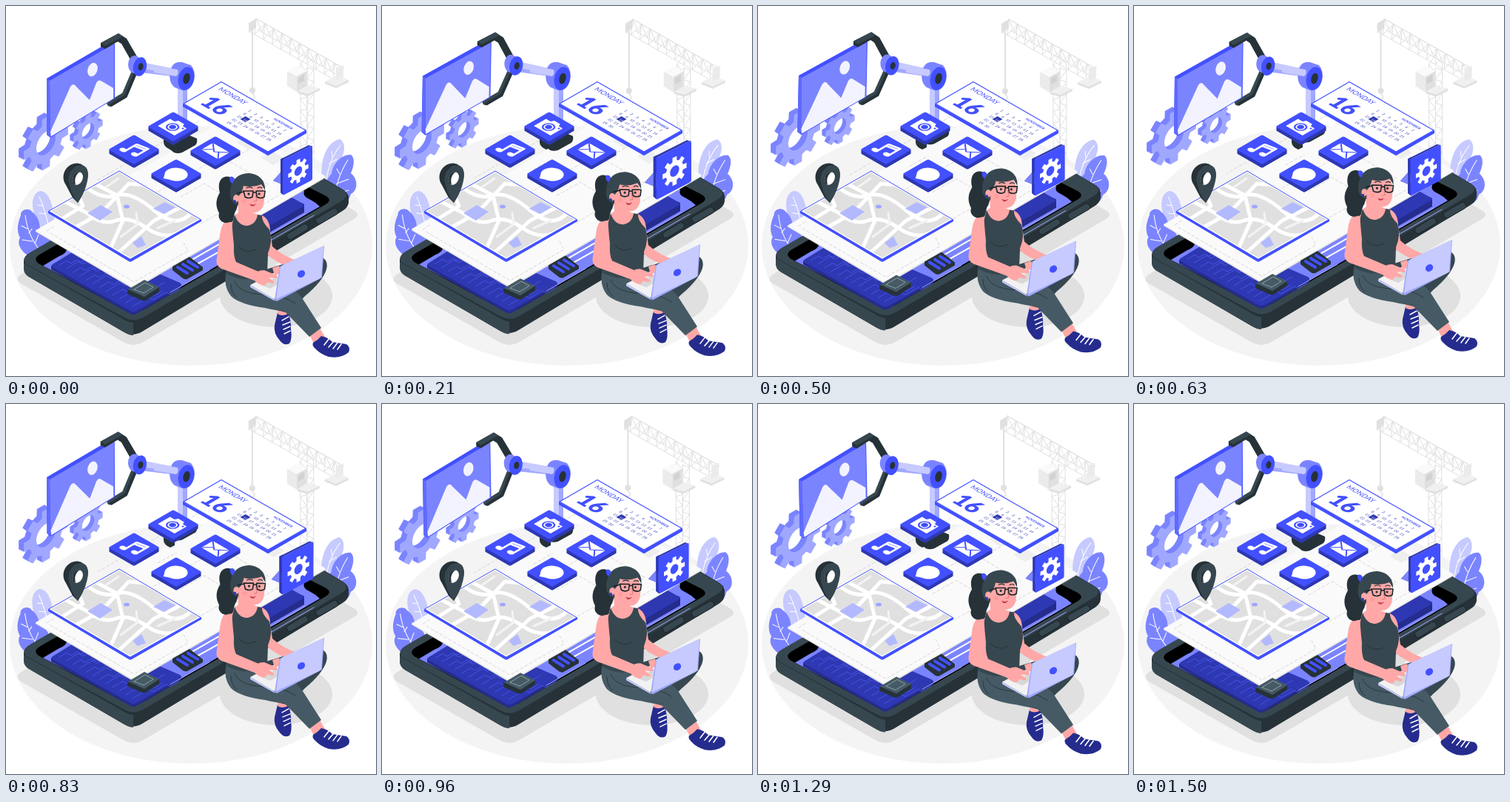
Animation of 500x500 px, one loop 1.54 s. Source, as an HTML page:

```html
<!DOCTYPE html>
<html lang="en">
<head>
<meta charset="utf-8">
<style>
html, body { margin: 0; width: 100%; height: 100%; overflow: hidden; background: #fff; }
svg { display: block; width: 100vw; height: 100vh; }
path, polyline, line { stroke-linejoin: round; stroke-linecap: round; }
.ln { fill: none; }
.b { fill: #4250ff } .b2 { fill: #2e38b2 } .b3 { fill: #252c8e }
.p { fill: #7b84ff } .l { fill: #a0a7ff } .ll { fill: #c6caff }
.w { fill: #fff } .g { fill: #e0e0e0 } .f { fill: #fafafa }
.d { fill: #263238 } .d2 { fill: #37474f } .d3 { fill: #455a64 }
.s { fill: #ffa8a7 }
text { font-family: Lato, Inter, sans-serif; fill: #4250ff; text-anchor: middle; }
</style>
</head>
<body>
<svg viewBox="0 0 500 500">
<defs><clipPath id="mapClip"><path d="M61 277 153 225 260 288 168 340Z"/></clipPath></defs>

<ellipse cx="250" cy="324" rx="245" ry="162" fill="#f4f4f4"/>

<g id="crane">
  <path id="truss" class="ln" stroke="#e0e0e0" stroke-width="1"/>
  <path class="g" d="M328 23 338 17V29L328 36Z M332 30H334V112H332Z"/>
  <circle class="g" cx="333" cy="114" r="4"/>
  <path class="ln" stroke="#e0e0e0" stroke-width="1.5" d="M333 118Q339 124 333 126Q330 126 330 123"/>
  <path class="f" d="M380 88 393 81 406 88 393 95Z"/>
  <path fill="#ebebeb" d="M380 88 393 95V116L380 108Z"/><path class="g" d="M393 95 406 88V109L393 116Z"/>
  <path fill="#d2d2d2" d="M395 97 403 92V101L395 105Z"/>
  <path fill="#f0f0f0" d="M394 115 408 107 424 111 408 119Z"/><path class="g" d="M394 115 408 119 424 111V114L408 122 394 118Z"/>
  <path fill="#f0f0f0" d="M431 102 448 94 463 100 446 108Z"/><path class="g" d="M431 102 446 108 463 100V103L446 111 431 105Z"/>
  <path fill="#ebebeb" d="M446 84 456 80V96L446 101Z"/>
</g>

<g id="gears"></g>

<g id="leftPlant">
  <path class="ll" d="M50 302C33 283 31 254 46 250C57 250 65 266 66 302Z"/>
  <path class="p" d="M50 345C28 342 12 325 19 313C13 303 17 290 20 283C19 275 31 272 35 278C42 283 45 290 46 299C56 304 62 312 63 335Z"/>
  <path class="ln" stroke="#fff" stroke-width="1" d="M45 258Q53 275 58 300M50 270 43 269M54 281 45 280M26 283Q30 315 52 337M29 301 21 297M36 318 22 316M35 301 31 307M44 309 39 321"/>
</g>
<g id="rightPlant">
  <path class="ll" d="M430 245C421 219 430 184 451 180C461 185 458 204 447 213C445 228 439 240 430 245Z"/>
  <path class="p" d="M440 270C428 257 429 236 440 227C441 213 454 200 466 201C473 206 469 220 466 226C477 235 475 250 466 254C463 267 450 272 440 270Z"/>
  <path class="ln" stroke="#fff" stroke-width="1" d="M452 188Q437 207 432 238M441 204 440 196M437 213 447 207M462 208Q445 235 444 265M451 227 447 220M447 240 463 234M445 251 435 243M445 254 463 249"/>
</g>

<path class="g" d="M18 364Q12 369 20 375L160 455Q172 461 184 455L470 288Q480 282 470 276L300 180Z"/>
<ellipse class="g" cx="365" cy="392" rx="76" ry="42"/>

<g id="phone">
  <path class="d" d="M24 345Q24 338 33 333L300 178 430 233 452 246Q463 252 463 259V266Q462 273 453 278L184 440Q172 447 160 441L31 366Q24 362 24 354Z"/>
  <path class="d2" d="M24 347 160 424Q166 428 172 428V445Q166 445 160 441L31 366Q24 362 24 354Z"/>
  <path class="d2" d="M30 351Q18 342 33 333L300 178 430 234 452 247Q467 255 454 263L185 421Q172 428 160 421Z"/>
  <path class="ln" stroke="#263238" stroke-width=".8" d="M27 349 160 422Q166 426 172 426"/>
  <path fill="#000" d="M44 348Q36 342 45 336L300 190 431 256Q442 262 432 268L185 411Q172 418 160 411Z"/>
  <path class="p" d="M50 351 72 338Q85 333 81 325L80 320 300 195 403 250Q400 257 410 261Q418 265 424 271L185 409Q172 416 160 409Z"/>
  <path class="b3" d="M61 351 61 356 168 416Q172 418 176 416L237 381V376Z"/>
  <path class="b2" d="M63 349 110 320 235 374Q239 377 235 379L176 412Q172 414 168 412L63 353Q60 351 63 349Z"/>
  <path id="circuit" class="ln" stroke="#4a56e8" stroke-width=".9"/>
  <path class="b3" d="M310 306 400 266 403 268V279L330 321Z"/>
  <path class="b2" d="M290 302 385 258 401 267Q404 269 401 271L325 315Z"/>
  <path class="ln" stroke="#a0a7ff" stroke-width="1" d="M345 324 416 283M222 387 275 357M345 316 405 281"/>
  <path class="ln" stroke="#1b2429" stroke-width="10" d="M384 311 404 299M423 290 444 278"/>
  <path class="ln" stroke="#37474f" stroke-width="8" d="M384 311 404 299M423 290 444 278"/>

  <path class="ln" stroke="#fff" stroke-width="2" d="M235 341 320 292M246 346 330 298M258 349 340 303"/>
  <path class="g" d="M40 303V305L171 382Q173 383 175 382L432 232V230Z"/>
  <path class="f" d="M42 302 299 152 430 229Q433 230 430 232L175 380Q173 381 171 380L42 305Q39 303 42 302Z"/>
  <path class="ln" stroke="#d8d8d8" stroke-width="1" stroke-dasharray="4 3" d="M55 304 66 297M60 307 173 373 246 331 240 320M200 254 290 203 355 241 262 295M124 235 260 156M285 260 315 277 338 263M236 258 268 240 305 262M300 210 335 190 410 232 320 284M205 223 230 209"/>
  <path fill="#eeeeee" d="M312 184 325 177 340 186 327 194ZM345 205 360 196 376 206 361 215Z"/>

  <path class="d" d="M164 384V389L184 398Q187 399 190 397L207 386V380Z"/>
  <path class="d3" d="M165 383 187 370 207 380 187 393Z"/>
  <path class="ln" stroke="#90a4ae" stroke-width="1" stroke-dasharray="3 1" d="M173 383 188 374 199 380 186 388Z"/>
  <path class="d" d="M225 352 248 339 266 353V357L245 369Q242 370 239 368L225 357Z"/>
  <path class="ln" stroke="#4250ff" stroke-width="4" d="M232 353 245 361M239 349 252 357M246 345 259 353"/>
</g>

<path class="d" d="M213 180H228V191L222 194Q213 190 213 184Z"/>
<g id="robotBase">
  <path class="d" d="M214 183Q213 188 218 191L227 198Q232 200 238 198L256 188Q259 185 258 179L236 170Z"/>
</g>
<path class="ll" d="M232 104H245V168H232Z"/><path class="l" d="M239 108H245V168H239Z"/>
<g id="arm">
  <path class="ln" stroke="#37474f" stroke-width="7" d="M174 87 160 120 140 132"/>
  <path class="ln" stroke="#263238" stroke-width="4" d="M175 91 162 122 142 134"/>
  <path class="b" d="M55 98 141 48 147 51V125L60 178 55 174Z"/>
  <path class="p" d="M59 101 146 51V125L60 177Z"/>
  <path fill="#5f6aff" d="M55 98 59 101 60 177 55 174Z"/>
  <path fill="#f3f3ff" d="M61 176 60 170 87 109Q91 103 95 109L113 127 122 104Q125 98 130 102L145 111V125Z"/>
  <ellipse cx="117" cy="86" rx="6.5" ry="9.5" fill="#f3f3ff" transform="rotate(18 117 86)"/>
  <path class="d" d="M128 50 152 37 163 44 178 70 169 74 156 51 151 48 134 58 128 55Z"/>
  <path class="d2" d="M128 50 152 37 158 41 134 54Z"/>
  <path class="ll" d="M184 76 234 86V96L184 90Z"/><path class="l" d="M184 85 234 92V96L184 90Z"/>
  <ellipse class="p" cx="174" cy="79" rx="9" ry="12"/>
  <ellipse class="b" cx="181" cy="82" rx="9" ry="13" transform="rotate(12 181 82)"/>
  <ellipse class="d" cx="182" cy="82" rx="3.5" ry="5" transform="rotate(12 182 82)"/>
</g>
<path class="p" d="M222 88Q225 74 238 76L250 80Q257 88 254 101Q249 116 238 114L228 110Q219 103 222 88Z"/>
<path class="ll" d="M200 80 232 86Q234 92 230 95L200 90Z"/>
<ellipse class="b" cx="243.500" cy="98" rx="10.500" ry="16" transform="rotate(14 243.5 98)"/>
<ellipse class="d" cx="244" cy="98" rx="4.500" ry="7.500" transform="rotate(14 244 98)"/>

<path class="b" d="M57 277 168 340 264 288V291L170 345Q168 346 166 345L57 280Z"/>
<path fill="#fff" stroke="#4250ff" d="M58 277 153 223 263 288.500 168 342Z"/>
<g clip-path="url(#mapClip)">
  <path class="g" d="M58 277 153 223 263 289 168 343Z"/>
  <path class="ln" stroke="#fff" stroke-width="5" d="M75 262 110 280Q130 297 148 290T190 300T238 305M110 246Q130 262 150 256T200 276T250 280M120 240 150 256 158 290 140 330M92 300 128 280 166 240 200 243M150 335 172 315 200 290 236 272M75 288 104 270 96 252"/>
  <path class="ln" stroke="#f3f3f3" stroke-width="3" d="M135 245 152 233M155 312 178 295 176 280M205 300 228 290"/>
  <path fill="#b3b9ff" d="M110 280 128 269 144 278 127 290ZM199 274 214 265 229 272 214 281ZM171 320 183 311 189 323 178 327Z"/>
  <ellipse cx="163" cy="271" rx="4" ry="2.500" class="l"/>
</g>

<path class="d" d="M81 242C70 225 88 207 102 214L108 218Q112 224 110 234Q106 252 97 266L90 259Z"/>
<path class="d2" d="M85 238C82 224 95 212 105 216C114 221 111 234 108 244Q104 256 97 266Q87 252 85 238Z"/>
<ellipse cx="97" cy="233" rx="6.500" ry="9" class="w" transform="rotate(25 97 233)"/>
<path class="d" d="M91 240C88 231 93 224 100 224C94 228 92 234 94 241Z"/>

<g id="icons"></g>

<path class="b" d="M239 132V136L352 201Q354 203 356 201L406 172V168L354 196Z"/>
<path fill="#fff" stroke="#4250ff" stroke-width="1.200" d="M240 132 291 102.500 405 168 354 197Z"/>
<g id="calendar"></g>

<g id="notice">
  <path class="b2" d="M371 207 375 205V255L371 252V240L361 236 371 225Z"/>
  <path class="p" d="M361 236 371 225 375 227V242Z"/>
  <path class="b" d="M374 208 412 189Q414 188 414 191V233Q414 235 412 236L376 255Q374 256 374 253Z"/>
  <path class="b2" d="M371 207 409 188 412 189 374 208V255L371 252Z"/>
  <g id="noticeGear"></g>
</g>

<g id="woman">
  <path class="b3" d="M367 414 381 412Q386 428 385 437Q387 450 383 456Q376 460 370 452Q361 442 363 431Z"/>
  <path class="ln" stroke="#fff" stroke-width="1.500" d="M373 425 382 420M374 431 384 427M375 437 384 433M376 443 384 439"/>
  <path class="s" d="M367 408 380 407 381 416Q373 420 367 416Z"/>
  <path class="d2" d="M345 358 410 338Q438 336 433 356Q428 372 404 392L382 415 366 411 385 378 350 390Z"/>
  <path class="s" d="M411 446 424 435 432 449Q426 457 416 456Z"/>
  <path class="b3" d="M415 455Q422 451 426 446Q434 447 441 454L460 457Q466 461 463 468Q452 477 436 474Q424 470 418 463Q413 459 415 455Z"/>
  <path class="ln" stroke="#fff" stroke-width="1.600" d="M430 458 437 449M436 461 443 453M442 463 448 455M448 464 453 457"/>
  <path class="d3" d="M298 358Q293 378 304 392Q315 403 350 408Q366 412 376 412L410 447 426 435 401 396Q393 383 376 380L353 362Z"/>
  <path class="ln" stroke="#263238" stroke-width=".8" d="M309 372Q315 388 346 390Q374 390 391 402M304 376Q304 388 312 394M376 381Q392 382 402 374"/>
  <path class="s" d="M344 282Q357 287 357 305L360 325Q374 338 396 345L391 354Q366 349 352 335Z"/>
  <path class="s" d="M313 264 330 268 332 279 347 284 340 310H308L304 287 314 279Z"/>
  <path class="d2" d="M309 282Q314 297 326 297Q338 295 340 282L346 283Q345 291 356 302Q361 317 354 334L353 362Q326 377 298 362L305 338 303 305Z"/>
  <path class="ln" stroke="#263238" stroke-width=".9" d="M314 325Q324 336 338 329"/>
  <path class="s" d="M305 285Q291 290 289 310L285 340Q282 352 294 356L336 371 346 361 311 346Q307 338 308 323 306 306 305 285Z"/>
  <path fill="#f2f2f2" d="M330 377 365 359 398 376 362 396Z"/>
  <path class="ll" d="M330 377 362 396 364 399 330 380Z"/>
  <path fill="#d8d8d8" d="M345 377 366 366 376 371 357 382Z"/>
  <path class="s" d="M334 369Q335 357 349 357L366 364Q369 367 364 368L355 367 363 373Q361 377 354 373L349 378Q341 377 334 369Z"/>
  <path class="s" d="M360 354 369 351 373 361 363 364Z"/>
  <path class="l" d="M363 397 370 352 430 324 427 367 366 399Z"/>
  <path class="ll" d="M365 396 371 353Q372 351 374 350L427 325Q429 324 429 327L426 364Q426 367 423 369Z"/>
  <ellipse class="b" cx="399" cy="362" rx="5.500" ry="4.500" transform="rotate(-40 399 362)"/>
  <g id="head">
    <path class="d" d="M306 232C291 226 285 238 289 252C282 264 284 272 288 280C285 289 295 296 302 292C310 293 306 283 311 276C316 264 316 244 306 232Z"/>
    <path class="s" d="M312 247 340 235Q350 245 349 260Q349 277 337 279Q323 282 314 272Z"/>
    <path class="d2" d="M303 258C301 240 310 226 328 226C343 227 351 237 350 249L345 241Q333 246 321 243Q319 253 314 257L314 269Q305 267 303 258Z"/>
    <path class="b" d="M302 231Q307 229 309 234L306 240Q302 239 302 231Z"/>
    <ellipse class="s" cx="311" cy="260" rx="4" ry="5"/><circle class="b2" cx="309" cy="264" r="2"/>
    <path class="ln" stroke="#263238" stroke-width="1.200" d="M325 246Q329 244 333 246M340 246Q343 244 346 246"/>
    <path class="ln" stroke="#1b2429" stroke-width="1.600" d="M313 253 321 251M321 250H334L333 258Q328 261 323 258ZM338 250H350L349 258Q344 261 339 258ZM334 252H338"/>
    <circle class="d" cx="328" cy="254" r="1.600"/><circle class="d" cx="342" cy="254" r="1.600"/>
    <path class="ln" stroke="#e57373" stroke-width="1" d="M337 255 339 263 335 264"/>
    <path fill="#c62f4b" d="M329 267Q334 270 338 267Q335 272 331 270Z"/>
    <circle cx="322" cy="264" r="3" fill="#ff8f8f" opacity=".5"/>
  </g>
</g>
</svg>
<script>
const LOOP = 1540, TAU = Math.PI * 2;
const $ = id => document.getElementById(id);

function gearPath(teeth, outer, inner, hole) {
  let d = '';
  for (let i = 0; i < teeth; i++) {
    [[-.32, inner], [-.22, outer], [.22, outer], [.32, inner]].forEach(([k, r]) => {
      const a = (i + k) / teeth * TAU;
      d += (d ? 'L' : 'M') + (Math.cos(a) * r).toFixed(2) + ' ' + (Math.sin(a) * r).toFixed(2);
    });
  }
  return `${d}ZM${hole} 0A${hole} ${hole} 0 1 0 ${-hole} 0A${hole} ${hole} 0 1 0 ${hole} 0Z`;
}

// Upright gear facing right, extruded toward the left
function gear(x, y, outer, inner, hole, depth, teeth = 8) {
  const d = gearPath(teeth, outer, inner, hole);
  let out = '';
  for (let i = depth; i >= 0; i--)
    out += `<path class="${i ? 'p' : 'l'}" fill-rule="evenodd" d="${d}" transform="matrix(.866 -.5 0 1 ${x - i} ${y - i * .5})"/>`;
  return out;
}
$('gears').innerHTML = gear(111, 169, 23, 17, 9.5, 5) + gear(54, 185, 35, 26, 15, 7);
$('noticeGear').innerHTML = `<path class="w" fill-rule="evenodd" d="${gearPath(8, 16, 11.5, 6)}" transform="matrix(.866 -.42 0 1 395 223)"/>`;

// Truss: two chords joined by a zigzag
function truss(ax, ay, bx, by, ox, oy, n) {
  let d = `M${ax} ${ay}L${bx} ${by}M${ax + ox} ${ay + oy}L${bx + ox} ${by + oy}M${ax} ${ay}`;
  for (let i = 1; i <= n; i++) {
    const k = i / n, side = i % 2;
    d += `L${ax + (bx - ax) * k + ox * side} ${ay + (by - ay) * k + oy * side}`;
  }
  return d;
}
$('truss').setAttribute('d',
  truss(338, 17, 456, 84, -8, 18, 20) + truss(338, 17, 456, 84, 2, 15, 20) +
  truss(398, 78, 398, 205, 9, 5, 16) + truss(407, 83, 407, 210, 9, -5, 16) +
  'M398 78 407 66 416 78');

let wires = '';
for (let i = 0; i < 12; i++) {
  const x = 72 + i * 9, y = 350 + i * 5.1, n = 10 + i * 7 % 13;
  wires += `M${x} ${y}l${n} ${-n * .577}l6 3.5l${n * .8} ${-n * .46}l5 3l12 -7`;
}
$('circuit').setAttribute('d', wires);

const iso = (x, y) => `transform="matrix(.866 .5 -.866 .5 ${x} ${y})"`;
const slab = (fill, x, y) => `<rect class="${fill}" x="-20" y="-20" width="40" height="40" rx="2" ${iso(x, y)}/>`;
const icon = (x, y, glyph) => {
  let out = '';
  for (let i = 5; i; i--) out += slab('b2', x, y + i);
  return out + slab('b', x, y) + `<g ${iso(x, y)}>${glyph}</g>`;
};
$('icons').innerHTML =
  icon(173, 194, '<path class="ln" stroke="#fff" stroke-width="3" d="M-5 9V-9L10 -12V6M-5 -5 10 -8"/><ellipse class="w" cx="-8" cy="9" rx="4.500" ry="3.500"/><ellipse class="w" cx="7" cy="6" rx="4.500" ry="3.500"/>') +
  icon(226, 163, '<path class="w" d="M-13 -8H-6L-4 -12H5L7 -8H13V11H-13Z"/><circle class="b" cx="0" cy="1" r="7.500"/><circle class="w" cx="0" cy="1" r="5.500"/><circle class="b" cx="0" cy="1" r="4"/><circle class="b" cx="10" cy="-5" r="1.300"/>') +
  icon(283, 196, '<path class="w" d="M-13 -9H13V9H-13Z"/><path class="ln" stroke="#4250ff" stroke-width="1.600" d="M-13 -9 0 2 13 -9M-13 9 -4 -1M13 9 4 -1"/>') +
  icon(230, 227, '<path class="w" d="M-9 9L-4 16 2 13A13 12.500 0 1 0 -9 9Z"/>');

const label = (x, y, size, s, more = '') => `<text ${iso(x, y)} font-size="${size}" ${more}>${s}</text>`;
let cal = label(304, 123, 9.3, 'MONDAY') + label(275, 140, 30, '16', 'font-weight="900"') +
  label(373, 160, 5, 'NOVEMBER', 'font-weight="700"') +
  `<rect class="b2" x="-4" y="-4" width="8" height="8" ${iso(323.5, 153)}/>`;
for (let day = 1; day <= 30; day++) {
  const col = (day - 1) % 7, row = (day - 1) / 7 | 0;
  cal += label(328 + col * 7.8 - row * 7, 142.6 + col * 4.4 + row * 4.1, 5, day,
    `style="fill:${day === 16 ? '#fff' : '#2e38b2'}"`);
}
$('calendar').innerHTML = cal;

const pulse = [[0, 1], [210, 1.19], [380, 1.03], [630, 1.035], [830, 1.07], [1130, .97], [1500, 1], [LOOP, 1]];
function pulseAt(t) {
  const i = pulse.findIndex(([time]) => time > t);
  const [t0, a] = pulse[i - 1], [t1, b] = pulse[i];
  return a + (b - a) * (1 - Math.cos((t - t0) / (t1 - t0) * Math.PI)) / 2;
}

const move = (id, value) => $(id).setAttribute('transform', value);
function draw() {
  const t = performance.now() % LOOP;
  const wave = Math.sin(t / LOOP * TAU);
  const rise = -4.2 * (1 - Math.cos((t + 30) / LOOP * TAU));
  for (const id of ['phone', 'gears', 'woman']) move(id, `translate(0 ${rise})`);
  move('robotBase', `translate(0 ${rise * 1.8})`);
  move('head', `rotate(${-rise * .12} 318 280)`);
  move('arm', `rotate(${wave * 1.4} 238 95)`);
  move('crane', `translate(${wave} ${wave})`);
  move('leftPlant', `rotate(${wave * 1.8} 52 345)`);
  move('rightPlant', `rotate(${wave * 1.8} 438 270)`);
  move('notice', `translate(393 223) scale(${pulseAt(t)}) translate(-393 -223)`);
  requestAnimationFrame(draw);
}
draw();
</script>
</body>
</html>
```
